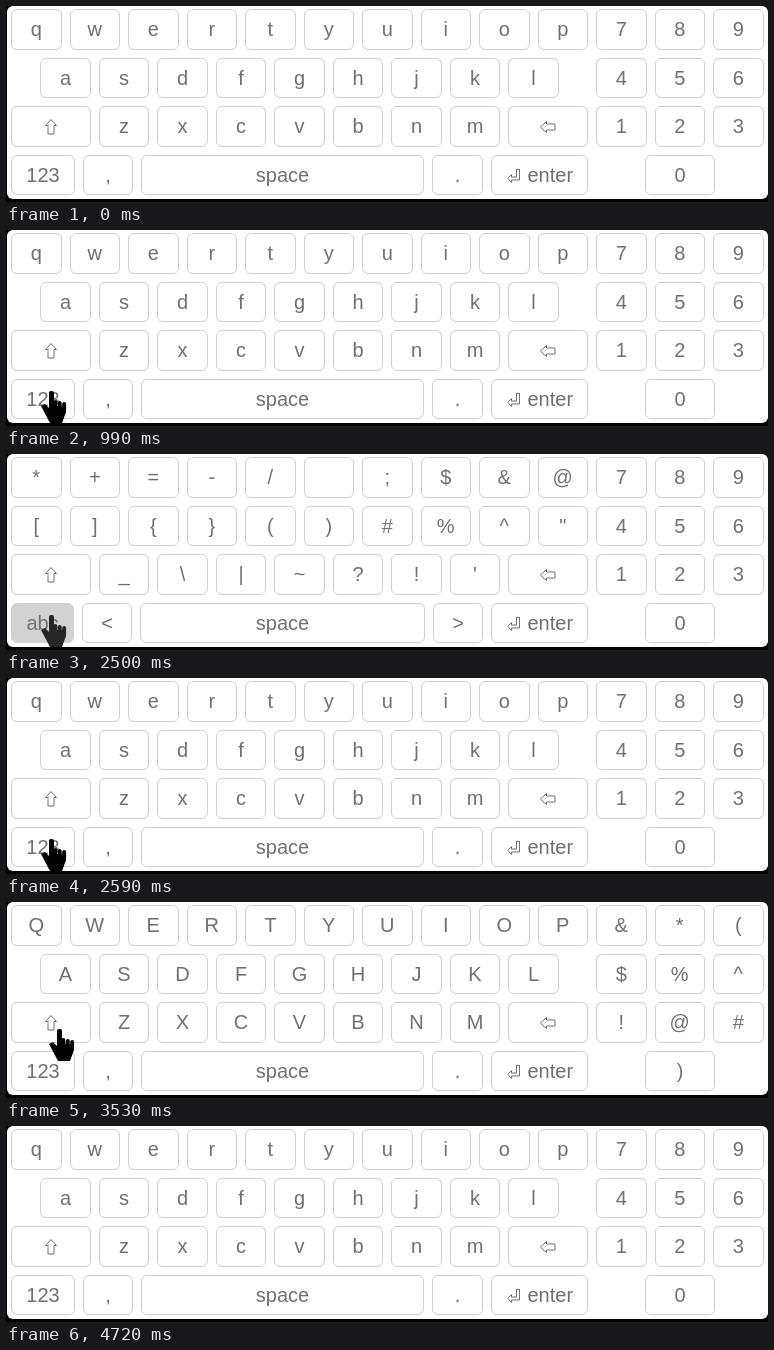
Recreate the animation shown at these times as an HTML page with a canvas. Size 762 px wide and 196 px high, loop 5570 ms.

```html
<!DOCTYPE html>
<html lang="en">
<head>
<meta charset="utf-8">
<title>On-screen keyboard</title>
<style>
  html, body { margin: 0; width: 762px; height: 196px; overflow: hidden; background: #000; }
  canvas { display: block; }
</style>
</head>
<body>
<canvas id="stage" width="762" height="196"></canvas>
<script>
const ctx = document.getElementById('stage').getContext('2d');
const LOOP = 5570;
const PITCH = 58.5, KEY_W = 50.5, LEFT = 5;
const INK = '#707070', BORDER = '#cfcfcf', PRESSED = '#d2d2d2';

const letters = ['qwertyuiop', 'asdfghjkl', 'zxcvbnm', '123', ',', '.'];
const LAYOUTS = {
  lower: letters,
  upper: letters.map(row => row.toUpperCase()),
  symbols: ['*+=-/ ;$&@', '[]{}()#%^"', "_\\|~?!'", 'abc', '<', '>']
};
const PAD = ['789', '456', '123', '0'];
const PAD_SHIFT = ['&*(', '$%^', '!@#', ')'];

const PRESSES = [
  { down: 1200, up: 1310, key: 'mode', next: 'symbols' },
  { down: 2500, up: 2590, key: 'mode', next: 'lower' },
  { down: 3320, up: 3530, key: 'shift', next: 'upper' },
  { down: 4190, up: 4290, key: 'shift', next: 'lower' }
];

// The pointer moves in sampled jumps, one every gap ms; power eases out
const OFFSTAGE = { x: 597, y: 196 };
const GLIDES = [
  { start: 260, gap: 104, steps: 8, x: 35, y: 161, power: 2.57 },
  { start: 2820, gap: 100, steps: 3, x: 43, y: 129, power: 1 },
  { start: 3230, gap: 90, steps: 1, x: 43, y: 127, power: 1 },
  { start: 4500, gap: 110, steps: 3, x: 258, y: 200, power: 1 }
];

function pointerAt(t) {
  let { x, y } = OFFSTAGE;
  for (const g of GLIDES) {
    if (t < g.start) break;
    const u = Math.min(1, (Math.floor((t - g.start) / g.gap) + 1) / g.steps);
    const rest = (1 - u) ** g.power;
    x = g.x + (x - g.x) * rest;
    y = g.y + (y - g.y) * rest;
  }
  return [Math.floor(x), Math.floor(y)];
}

function keysAt(t) {
  const pressed = PRESSES.find(p => t >= p.down && t < p.up);
  const last = PRESSES.findLast(p => t >= p.up);
  return [last ? last.next : 'lower', pressed ? pressed.key : ''];
}

const column = i => LEFT + PITCH * i;
const rowTop = r => Math.round(3 + 48.6 * r);
const rowBottom = r => Math.round(43.6 + 48.6 * r);

function poly(points) {
  ctx.beginPath();
  points.forEach(([x, y]) => ctx.lineTo(x, y));
  ctx.closePath();
}

function label(text, x, row, align = 'center') {
  ctx.fillStyle = INK;
  ctx.textAlign = align;
  ctx.fillText(text, x, rowTop(row) + 27);
}

function key(text, x0, x1, row, pressed) {
  const x = Math.round(x0), y = rowTop(row);
  ctx.beginPath();
  ctx.roundRect(x + .5, y + .5, Math.round(x1) - x - 1, rowBottom(row) - y - 1, 5.5);
  ctx.fillStyle = pressed ? PRESSED : '#fff';
  ctx.fill();
  ctx.strokeStyle = pressed ? PRESSED : BORDER;
  ctx.stroke();
  if (text) label(text, (x0 + x1) / 2, row);
}

function keyRow(chars, first, row) {
  [...chars].forEach((c, i) => key(c.trim(), column(first + i), column(first + i) + KEY_W, row));
}

// Hollow arrow pointing up, or left when turned
function arrow(x, y, turn) {
  const half = [[0, -7.5], [5.5, -1.5], [3, -1.5], [3, 7]];
  ctx.save();
  ctx.translate(x, y);
  ctx.rotate(turn);
  poly([...half, ...half.map(([px, py]) => [-px, py]).reverse()]);
  ctx.strokeStyle = INK;
  ctx.stroke();
  ctx.restore();
}

// Hollow return arrow: a bent stem with a head on the left
function returnArrow(x, y) {
  ctx.save();
  ctx.translate(x, y);
  poly([[0, 0], [4, -4], [4, -1.5], [9, -1.5], [9, -9], [12, -9], [12, 1.5], [4, 1.5], [4, 4]]);
  ctx.strokeStyle = INK;
  ctx.stroke();
  ctx.restore();
}

function hand(x, y, dim) {
  ctx.save();
  ctx.translate(x, y);
  ctx.fillStyle = dim ? '#262626' : '#000';
  poly([[0, 15], [4, 13], [8, 17], [10, 15], [25, 15], [25, 21], [21, 32], [9, 32]]);
  ctx.fill();
  for (let i = 0; i < 4; i++) {
    const top = i ? 8 + i : 0;
    ctx.beginPath();
    ctx.roundRect(8 + 4.4 * i, top, i ? 3.9 : 5, 20 - top, 2);
    ctx.fill();
  }
  ctx.restore();
}

function keyboard(name, pressed) {
  const [top, middle, bottom, mode, comma, stop] = LAYOUTS[name];
  const symbols = name === 'symbols';
  const nudge = symbols ? 1 : 0;
  keyRow(top, 0, 0);
  keyRow(middle, symbols ? 0 : .5, 1);
  keyRow(bottom, 1.5, 2);

  key('', 5, 85, 2, pressed === 'shift');
  arrow(45, 121, 0);
  key('', 502, 582, 2);
  arrow(542, 121, -Math.PI / 2);

  key(mode, 5, 69 - nudge, 3, pressed === 'mode');
  key(comma, 77 - nudge, 127 - nudge, 3);
  key('space', 135 - nudge, 418 + nudge, 3);
  key(stop, 426 + nudge, 477, 3);
  key('', 485, 582, 3);
  returnArrow(501.5, 172.5);
  label('enter', 521.5, 3, 'left');

  const pad = name === 'upper' ? PAD_SHIFT : PAD;
  for (let r = 0; r < 3; r++) keyRow(pad[r], 10, r);
  key(pad[3], 639, 709, 3);
}

function draw(t) {
  ctx.fillStyle = '#000';
  ctx.fillRect(0, 0, 762, 196);
  ctx.beginPath();
  ctx.roundRect(1, 0, 761, 193, 6);
  ctx.fillStyle = '#fff';
  ctx.fill();

  ctx.font = '20px "Liberation Sans", Arial, sans-serif';
  ctx.lineWidth = 1;
  const [layout, pressed] = keysAt(t);
  keyboard(layout, pressed);
  hand(...pointerAt(t), pressed === 'mode');
}

const start = performance.now();
function tick() {
  draw((performance.now() - start) % LOOP);
  requestAnimationFrame(tick);
}
tick();
</script>
</body>
</html>
```
